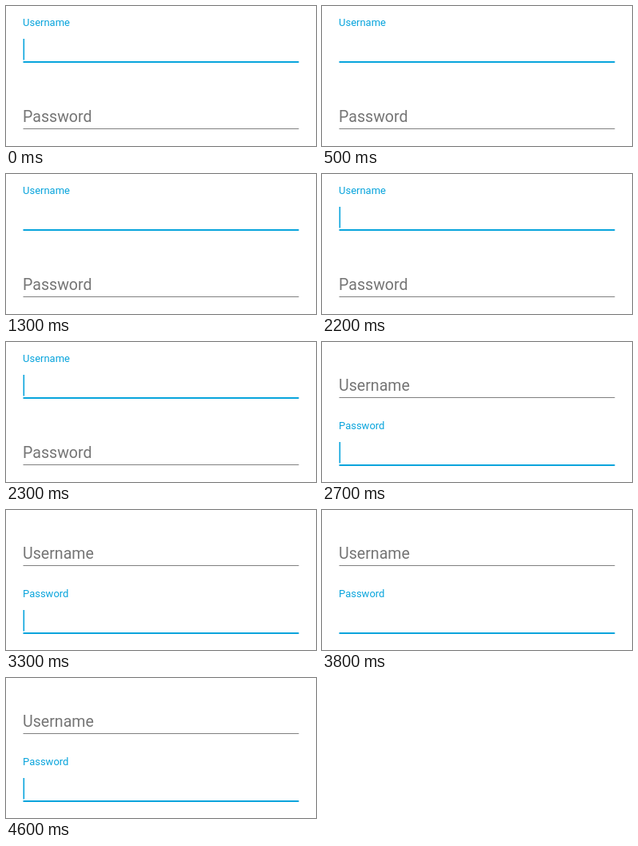
Animation, 388 px wide and 175 px high, one loop 4700 ms. Source, as an HTML page:

```html
<!DOCTYPE html>
<html lang="en">
<head>
<meta charset="utf-8">
<title>Floating labels</title>
<style>
  html, body { margin: 0; width: 100%; height: 100%; overflow: hidden; background: #fff; }
  svg { display: block; width: 388px; height: 175px; }
  text { font-family: Roboto, sans-serif; }
</style>
</head>
<body>
<svg viewBox="0 0 388 175">
  <g class="field">
    <text x="21">Username</text>
    <rect class="line" x="21.5" width="345"/>
    <rect class="cursor" x="21.5" y="41" width="1.6" height="26.5"/>
  </g>
  <g class="field" transform="translate(0 84)">
    <text x="21">Password</text>
    <rect class="line" x="21.5" width="345"/>
    <rect class="cursor" x="21.5" y="41" width="1.6" height="26.5"/>
  </g>
</svg>
<script>
const LOOP = 4700, SWITCH = 2464, DURATION = 200;
const GRAY = [117, 117, 117], BLUE = [8, 164, 220];
const BLINKS = [400, 900, 1300, 1900, 2400, SWITCH, 2900, 3300, 3800, 4300];

const lerp = (a, b, k) => a + (b - a) * k;
const rgb = c => `rgb(${c.map(Math.round)})`;
const blend = (a, b, k) => rgb(a.map((v, i) => lerp(v, b[i], k)));

// cubic-bezier(.4, 0, .2, 1)
function fastOutSlowIn(x) {
  let lo = 0, hi = 1;
  for (let i = 0; i < 20; i++) {
    const u = (lo + hi) / 2, v = 1 - u;
    if (1.2 * v * v * u + 0.6 * v * u * u + u ** 3 < x) lo = u; else hi = u;
  }
  return lo * lo * (3 - 2 * lo);
}

const fields = [...document.querySelectorAll('.field')].map(g => ({
  label: g.querySelector('text'),
  line: g.querySelector('.line'),
  cursor: g.querySelector('.cursor')
}));

// raised: 0 = resting inside the field, 1 = floating above it
function drawField({ label, line, cursor }, raised, focused, cursorOn) {
  label.setAttribute('y', lerp(61, 24.6, raised * raised));
  label.setAttribute('font-size', lerp(19.6, 13, fastOutSlowIn(raised)));
  label.setAttribute('fill', focused ? blend(GRAY, BLUE, raised) : rgb(GRAY));
  line.setAttribute('y', 69);
  line.setAttribute('height', focused ? 2 : 1);
  line.setAttribute('fill', focused ? rgb(BLUE) : '#808080');
  cursor.setAttribute('fill', rgb(BLUE));
  cursor.setAttribute('visibility', focused && cursorOn ? 'visible' : 'hidden');
}

function frame() {
  const t = performance.now() % LOOP;
  const k = Math.min(1, Math.max(0, (t - SWITCH) / DURATION));
  const cursorOn = BLINKS.filter(b => b <= t).length % 2 === 0;
  drawField(fields[0], 1 - k, t < SWITCH, cursorOn);
  drawField(fields[1], k, t >= SWITCH, cursorOn);
  requestAnimationFrame(frame);
}
frame();
</script>
</body>
</html>
```
